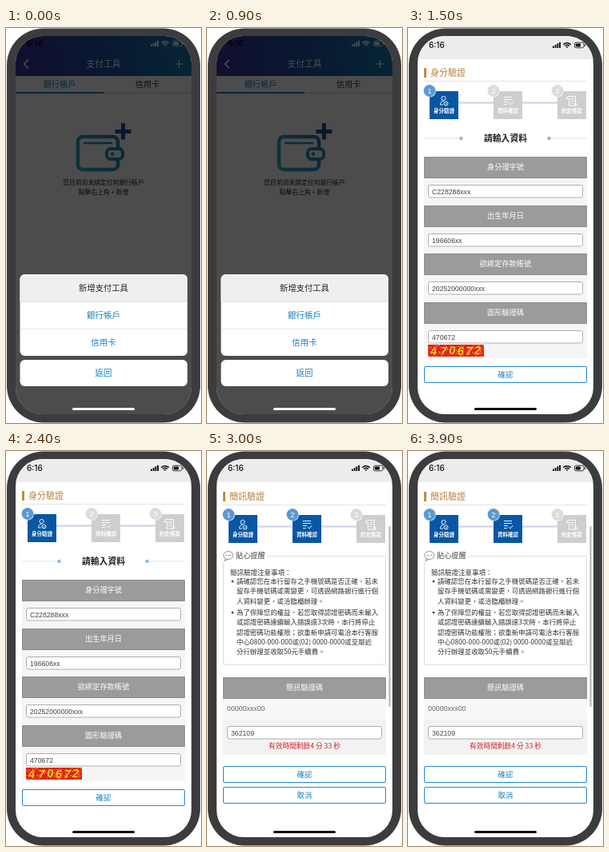
Write an HTML page with a canvas that moves like this. It is 244 px wide and 494 px high and loops after 4.5 s.

```html
<!DOCTYPE html>
<html lang="zh-Hant">
<head>
<meta charset="utf-8">
<title>支付工具</title>
<style>
html, body { margin: 0; width: 100%; height: 100%; overflow: hidden; background: #fff; }
canvas { display: block; width: 244px; height: 494px; }
</style>
</head>
<body>
<canvas id="stage"></canvas>
<script>
const W = 244, H = 494, SCENE_MS = 1500;
const canvas = document.getElementById('stage');
const ctx = canvas.getContext('2d');
const scale = window.devicePixelRatio || 1;
canvas.width = W * scale;
canvas.height = H * scale;

const CJK = '"Noto Sans CJK TC", "Noto Sans CJK", sans-serif';
const LATIN = '"Liberation Sans", Arial, sans-serif';
const BLUE = '#0757a4', LINK = '#1580c6', GRAY = '#9b9b9b', PALE = '#cecece';

function rect(x, y, w, h, fill) {
  ctx.fillStyle = fill;
  ctx.fillRect(x, y, w, h);
}

function roundPath(x, y, w, h, r) {
  ctx.beginPath();
  ctx.roundRect(x, y, w, h, r);
}

function box(x, y, w, h, r, fill, stroke, width = 1) {
  roundPath(x, y, w, h, r);
  if (fill) { ctx.fillStyle = fill; ctx.fill(); }
  if (stroke) { ctx.strokeStyle = stroke; ctx.lineWidth = width; ctx.stroke(); }
}

function disc(x, y, r, fill) {
  ctx.beginPath();
  ctx.arc(x, y, r, 0, Math.PI * 2);
  ctx.fillStyle = fill;
  ctx.fill();
}

function pathLine(d, color, width = 1) {
  ctx.strokeStyle = color;
  ctx.lineWidth = width;
  ctx.stroke(new Path2D(d));
}

// y is the visual middle of the line of text.
function text(s, x, y, size, color, { align = 'left', weight = 500, font = CJK } = {}) {
  ctx.font = `${weight} ${size}px ${font}`;
  ctx.textAlign = align;
  ctx.textBaseline = 'alphabetic';
  ctx.fillStyle = color;
  ctx.fillText(s, x, y + size * (font === CJK ? 0.38 : 0.36));
}

const centered = (s, y, size, color, weight = 500, x = 122) =>
  text(s, x, y, size, color, { align: 'center', weight });

function statusBar(y, clock, icons) {
  text('6:16', 26, y, 10, clock, { font: 'Inter, sans-serif' });
  for (let i = 0; i < 4; i++) {
    const h = 2.5 + i * 1.6;
    box(181 + i * 2.7, y + 3.5 - h, 1.9, h, 0.5, icons);
  }
  for (const r of [2, 4.6, 7.2]) {
    ctx.beginPath();
    ctx.arc(199, y + 3.6, r - 0.8, -Math.PI * 0.76, -Math.PI * 0.24);
    ctx.strokeStyle = icons;
    ctx.lineWidth = 1.6;
    ctx.stroke();
  }
  box(208.5, y - 3.3, 11.5, 6.6, 1.8, null, icons, 0.8);
  box(209.8, y - 2, 6.2, 4, 0.8, icons);
  rect(221, y - 1.1, 1, 2.2, icons);
}

const homeBar = color => box(83, 475, 78, 3, 1.5, color);

function wallet() {
  const g = ctx.createLinearGradient(88, 179, 145, 134);
  g.addColorStop(0, '#25b3c4');
  g.addColorStop(1, '#2277bd');
  box(90, 136, 50, 41, 6, null, g, 4.5);
  pathLine('M97 144H133', g, 2.5);
  box(126, 151, 20, 13, 5, '#fff', g, 4);
  disc(133, 157.5, 2.2, g);
  pathLine('M146.5 119V139.5M136.5 129.5H156.5', '#1f4da6', 5);
}

function paymentPage() {
  rect(12, 10, 220, 473, '#fff');
  const g = ctx.createLinearGradient(12, 59, 232, 10);
  g.addColorStop(0, '#3a329c');
  g.addColorStop(0.45, '#1f4ca2');
  g.addColorStop(1, '#127fae');
  rect(12, 10, 220, 50, g);
  statusBar(19.5, '#000', '#fff');
  pathLine('M28 39.5L22.5 45L28 50.5', '#fff', 1.6);
  centered('支付工具', 45, 10.8, '#fff');
  pathLine('M216.5 40V50M211.5 45H221.5', '#fff', 1.2);

  centered('銀行帳戶', 70.5, 10.2, LINK, 500, 67);
  centered('信用卡', 70.5, 10.2, '#333', 500, 177);
  rect(12, 81, 220, 1, '#d0d0d0');
  rect(12, 80, 110, 2, LINK);

  wallet();
  centered('您目前尚未綁定任何銀行帳戶', 193, 7.8, '#222');
  centered('點擊右上角 + 新增', 205, 7.8, '#222');
}

function paymentSheet() {
  paymentPage();
  rect(12, 10, 220, 473, 'rgba(0, 0, 0, 0.7)');
  box(17.5, 308, 209.5, 102, 6, '#fff');
  box(17.5, 308, 209.5, 34, [6, 6, 0, 0], '#efefef');
  rect(17.5, 342, 209.5, 0.7, '#d8d8d8');
  rect(17.5, 376, 209.5, 0.7, '#dedede');
  box(17.5, 415, 209.5, 33, 6, '#fff');
  centered('新增支付工具', 325, 10.3, '#222');
  centered('銀行帳戶', 359, 10.5, LINK);
  centered('信用卡', 393, 10.5, LINK);
  centered('返回', 431.5, 10.5, LINK);
  homeBar('#fff');
}

const stepIcons = [
  'M42 88a2.6 2.6 0 1 1 5.2 0a2.6 2.6 0 1 1-5.2 0M40.5 96Q40.5 91.5 44.5 91.5M45 94.5a2.5 2.5 0 1 1 5 0a2.5 2.5 0 1 1-5 0M46.3 94.5l1 1l1.5-1.8M40.5 96h3.5',
  'M40 86.5h10M40 89.5h10M40 92.5h5M40 95.5h4M46 94l2 2l3.5-4',
  'M41 85.5h8.5v11.5h-8.5M41 85.5q-2.5 0-2.5 3h3v8.5M43.5 88.5h4M43.5 91h4M43.5 93.5h2.5M47 97h4v-2.5h-3'
];

function steps(active, dy) {
  ctx.save();
  ctx.translate(0, dy);
  rect(63, 92.5, 124, 2, '#ccd0e4');
  ['身分驗證', '資料確認', '約定條款'].forEach((label, i) => {
    const on = i < active, x = 27 + i * 80;
    rect(x, 79, 36, 35, on ? BLUE : PALE);
    ctx.save();
    ctx.translate(i * 80, 0);
    pathLine(stepIcons[i], '#fff', 0.9);
    ctx.restore();
    centered(label, 103.5, 6.5, '#fff', 700, x + 18);
    disc(x, 78.5, 8, '#fff');
    disc(x, 78.5, 7.4, on ? '#5b99d2' : '#dcdcdc');
    text(String(i + 1), x, 78.5, 9, '#fff', { align: 'center', font: LATIN });
  });
  ctx.restore();
}

function formPage(title, active, dy) {
  rect(12, 10, 220, 473, '#fff');
  rect(12, 10, 220, 29, '#ececec');
  statusBar(21.5, '#111', '#111');
  rect(20, 50 + dy, 3, 12, '#c28c3c');
  text(title, 28, 56 + dy, 11, '#b98139');
  rect(20, 66 + dy, 204, 0.8, '#dedede');
  steps(active, dy);
  homeBar('#111');
}

function heading(label, y) {
  box(20.5, y + 0.5, 203, 26, 0, GRAY, '#8b8b8b');
  centered(label, y + 13, 9.2, '#fff');
}

function input(value, y) {
  box(25.5, y + 0.5, 193, 15.5, 2.5, '#fff', '#a8a8a8', 0.9);
  text(value, 30, y + 8.4, 8.7, '#444', { weight: 400, font: LATIN });
}

function button(label, y) {
  box(20.5, y + 0.5, 203, 20, 1.5, '#fff', '#2089d0');
  centered(label, y + 10, 9.4, LINK);
}

function captcha() {
  let seed = 7;
  const rnd = () => (seed = (seed * 16807) % 2147483647) / 2147483647;
  rect(25, 396, 70, 15, '#e3201b');
  [...'470672'].forEach((digit, i) => {
    text(digit, 28 + i * 10.6 + (i ? 2 : 0), 403.5 + Math.sin(i * 2) * 0.7, 14.5, '#f4dc22',
      { weight: 'italic 700', font: LATIN });
  });
  for (let i = 0; i < 190; i++) {
    rect(25 + rnd() * 69, 396 + rnd() * 14, 1, 1, rnd() < 0.6 ? '#f2b426' : '#d8301f');
  }
}

function identityForm() {
  formPage('身分驗證', 1, 0);
  centered('請輸入資料', 138, 10.8, '#222', 700);
  rect(20, 137.5, 47, 0.8, '#d5dde4');
  rect(177, 137.5, 47, 0.8, '#d5dde4');
  disc(66.5, 138, 2.2, '#8db9df');
  disc(176.5, 138, 2.2, '#8db9df');
  rect(20, 161, 204, 252, '#f5f5f5');
  const fields = [
    ['身分證字號', 'C228288xxx', 161],
    ['出生年月日', '196606xx', 222],
    ['欲綁定存款帳號', '20252000000xxx', 282],
    ['圖形驗證碼', '470672', 343]
  ];
  for (const [label, value, y] of fields) {
    heading(label, y);
    input(value, y + 35);
  }
  captcha();
  button('確認', 423);
}

function notice() {
  box(20.5, 131.5, 203, 135.5, 0, '#fff', '#d9d9d9', 0.9);
  rect(19, 125, 56, 13, '#fff');
  ctx.beginPath();
  ctx.ellipse(26.7, 130.5, 6, 5, 0, 0, Math.PI * 2);
  ctx.strokeStyle = '#888';
  ctx.lineWidth = 0.9;
  ctx.stroke();
  pathLine('M23 134.5L22 137.5L26 135.5', '#888', 0.9);
  for (const x of [24, 26.7, 29.4]) disc(x, 130.5, 0.75, '#777');
  text('貼心提醒', 36, 130.5, 9.2, '#444');
  text('簡訊驗證注意事項：', 29, 151.5, 8.5, '#333');
  const paragraphs = [
    [163, ['請確認您在本行留存之手機號碼是否正確，若未',
      '留存手機號碼或需變更，可透過網路銀行進行個',
      '人資料變更，或洽臨櫃辦理。']],
    [202, ['為了保障您的權益，若您取得認證密碼而未輸入',
      '或認證密碼連續輸入錯誤達3次時，本行將停止',
      '認證密碼功能權限；欲重新申請可電洽本行客服',
      '中心0800-000-000或(02) 0000-0000或至鄰近',
      '分行辦理並收取50元手續費。']]
  ];
  for (const [top, lines] of paragraphs) {
    disc(32, top, 1.5, '#1c5a9c');
    lines.forEach((line, i) => text(line, 37, top + i * 12.2, 8.45, '#333'));
  }
}

function smsForm() {
  formPage('簡訊驗證', 2, 1);
  notice();
  rect(20, 283, 204, 53, '#f7f7f7');
  rect(20, 336, 204, 44, '#f2f2f2');
  heading('簡訊驗證碼', 283);
  text('00000xxx00', 25, 322, 8.8, '#666', { weight: 400, font: LATIN });
  input('362109', 344);
  centered('有效時間剩餘4 分 33 秒', 368.5, 8.7, '#d9232a');
  button('確認', 394);
  button('取消', 420);
  box(227.5, 94, 2, 226, 1, '#b4b4b4');
}

const scenes = [paymentSheet, identityForm, smsForm];

function draw(time) {
  ctx.setTransform(scale, 0, 0, scale, 0, 0);
  rect(0, 0, W, H, '#fff');
  box(1, 0.5, W - 2, H - 1, 46, '#3c3c3e');
  ctx.save();
  roundPath(12, 10, 220, 473, 34);
  ctx.clip();
  scenes[Math.floor(time / SCENE_MS) % scenes.length]();
  ctx.restore();
}

const start = performance.now();
function tick() {
  draw(performance.now() - start);
  requestAnimationFrame(tick);
}
tick();
</script>
</body>
</html>
```
